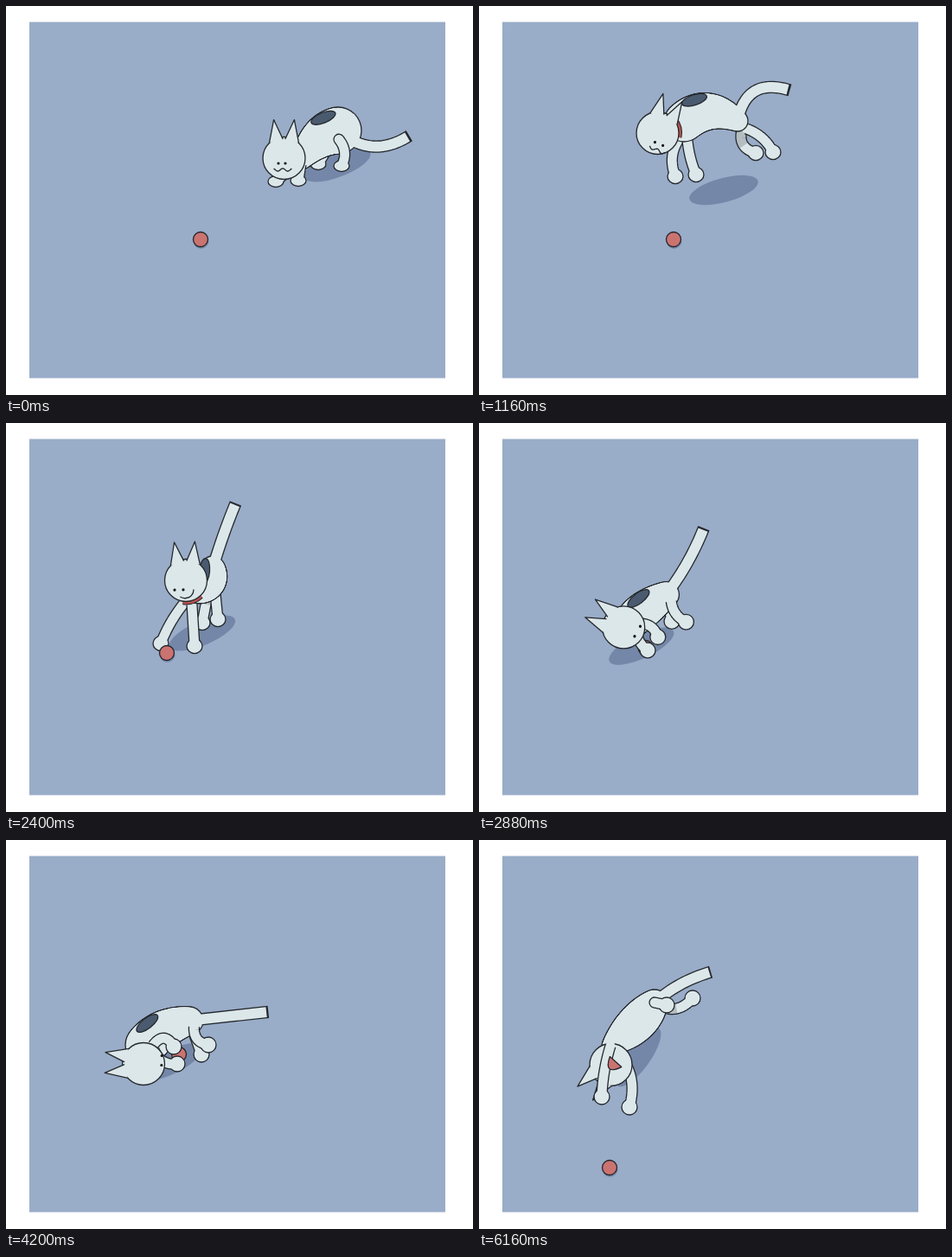
Recreate the animation shown at these times as an HTML page with a canvas. Size 540 by 450 pixels, loop 6.4 s.

```html
<!DOCTYPE html>
<html lang="en">
<head>
<meta charset="utf-8">
<title>Cat and ball</title>
<style>
html, body { margin: 0; height: 100%; overflow: hidden; background: #fff; }
canvas { display: block; }
</style>
</head>
<body>
<canvas id="stage" width="540" height="450"></canvas>
<script>
const ctx = document.getElementById('stage').getContext('2d');
const INK = '#24282c', FUR = '#dce7ea', FLOOR = '#99acc8', SHADE = '#7487a8', RED = '#cb7371', PATCH = '#4a5a6f';
const LOOP = 6400, TAU = 2 * Math.PI, HEAD = 24.5, PAW = 9, LINE = 1.3;

// layers: parts from back to front. spine: neck, middle, rump as x, y, radius.
// paws: far hind, near hind, far front, near front as x, y, bend; tail: tip and bend.
// head: x, y, tilt in degrees; face: offset of the eyes, half their distance.
const crouch = {
  layers: 's1bp534hewo', flat: .72, hip: .25, spot: .78, shadow: [383, 184, -.36],
  spine: [[342, 177, 12], [362, 154, 22], [384, 144, 27]],
  paws: [[361, 183, 0], [388, 185, -5], [312, 203, 0], [338, 202, 0]],
  tail: [465, 151, 15], head: [321.5, 176, -90], face: [-2.5, 6, 4]
};
const leap = {
  layers: 's1324bpchewo', flat: .95, hip: .25, spot: .3, shadow: [283, 213, -.26],
  spine: [[237, 134, 23], [266, 122, 21], [299, 133, 12]],
  paws: [[320, 170, 8], [340, 169, -4], [227, 197, 7], [251, 195, 2]],
  tail: [358, 97, -19], head: [206.5, 147, -67], face: [1.5, 12.5, 5]
};
const stand = {
  layers: 's1234bpcheuo', flat: .95, hip: .25, spot: .9, shadow: [227, 243, -.4],
  spine: [[214, 194, 13], [233, 186, 19], [239, 168, 14]],
  paws: [[227, 231, 0], [245, 227, 0], [179, 255, 2], [218, 258, 0]],
  tail: [265, 94, -1], head: [208, 182, -92], face: [-8, 11, 5]
};
const roll = {
  layers: 's1bp2o34he', flat: 1, hip: .25, spot: .35, shadow: [178, 262, -.45],
  spine: [[170, 235, 22], [185, 220, 21], [211, 206, 15]],
  paws: [[222, 229, 0], [238, 231, 5], [199, 265, 5], [204, 245, -6]],
  tail: [271, 154, 4], head: [165, 250, -174], face: [22, 3, 7]
};
const flop = { ...roll, tail: [258, 130, 4], head: [157, 250, -165] };
const cuddle = {
  ...roll, spot: .3, shadow: [190, 257, -.45],
  spine: [[162, 237, 24], [183, 219, 22], [212, 209, 16]],
  paws: [[226, 248, 0], [234, 237, 6], [198, 259, 6], [194, 239, -9]],
  tail: [302, 199, 0], head: [159, 259, -178], face: [21, -4, 5.5], gape: 1
};
const toss = {
  ...cuddle, layers: 's1bp234hego', shadow: [196, 250, -.5],
  paws: [[228, 250, 0], [207, 249, 0], [200, 271, 4], [190, 252, -11]],
  tail: [289, 151, 6], head: [161, 258, -201], face: [4.5, 5, 5], gape: 4
};
const reach = {
  ...toss, layers: 's13b5h4go', hip: 0, shadow: [184, 251, -.95],
  spine: [[152, 238, 10], [181, 213, 22], [203, 188, 15]],
  paws: [[247, 183, 10], [217, 191, 0], [174, 309, -12], [142, 297, 2]],
  tail: [267, 153, -4], head: [152.5, 260, -228], face: [-2.5, 5.5, 5], gape: 12
};

const poses = [[0, crouch], [900, crouch], [1160, leap], [1520, stand], [2400, stand], [3000, flop],
  [3360, roll], [3720, cuddle], [4480, cuddle], [5200, toss], [5920, reach], [LOOP, reach]];

// Ball: x, y, height above the floor
const balls = [[0, [225, 270, 0]], [1680, [225, 270, 0]], [2280, [186, 266, 0]], [2400, [186, 266, 0]],
  [3360, [199, 254, 0]], [3720, [200, 248, 0]], [4800, [200, 248, 0]],
  [5200, [186, 303, 18]], [5920, [151, 379, 0]], [LOOP, [151, 379, 0]]];

const range = (from, to, step) => Array.from({ length: (to - from) / step + 1 }, (_, i) => from + i * step);
const ticks = [0, ...range(320, 800, 120), 960, ...range(1000, 1160, 80), 1280, ...range(1400, 1480, 80),
  ...range(1560, 5040, 120), 5120, ...range(5200, 6160, 120)];

function mix(a, b, k) {
  if (a === undefined || b === undefined) return a ?? b;
  if (typeof a === 'number') return a + (b - a) * k;
  if (typeof a === 'string') return k < .5 ? a : b;
  if (Array.isArray(a)) return a.map((v, i) => mix(v, b[i], k));
  return Object.fromEntries(Object.keys({ ...a, ...b }).map(key => [key, mix(a[key], b[key], k)]));
}

function sample(keys, t) {
  const i = keys.findIndex(key => key[0] > t);
  const [t0, a] = keys[i - 1], [t1, b] = keys[i];
  return mix(a, b, (t - t0) / (t1 - t0));
}

// Parabola through three points at u = 0, 1/2 and 1
const along = ([a, b, c], u) =>
  a.map((v, i) => v * (1 - u) * (1 - 2 * u) + b[i] * 4 * u * (1 - u) + c[i] * u * (2 * u - 1));

function bow(from, [x, y, bend]) {
  const dx = x - from[0], dy = y - from[1], s = bend / Math.hypot(dx, dy);
  return [from.slice(0, 2), [from[0] + dx / 2 - dy * s, from[1] + dy / 2 + dx * s], [x, y]];
}

function band(points, width, color, cap = 'butt', end = 1) {
  ctx.beginPath();
  for (const u of range(0, 20, 1)) ctx.lineTo(...along(points, u / 20 * end));
  ctx.lineCap = cap;
  ctx.lineWidth = width;
  ctx.strokeStyle = color;
  ctx.stroke();
}

function ink(fill) {
  if (fill) { ctx.fillStyle = fill; ctx.fill(); }
  ctx.lineWidth = LINE;
  ctx.strokeStyle = INK;
  ctx.stroke();
}

function oval(x, y, rx, ry = rx, turn = 0) {
  ctx.beginPath();
  ctx.ellipse(x, y, rx, ry, turn, 0, TAU);
}

function dot(x, y, r, color) {
  oval(x, y, r);
  ctx.fillStyle = color;
  ctx.fill();
}

function drawBody({ spine, tail }) {
  const line = bow(spine[2], tail);
  for (const [color, grow, end] of [[INK, LINE / 2, 1.015], [FUR, -LINE / 2, .99]]) {
    band(line, 13 + 2 * grow, color, 'butt', end);
    for (const u of range(0, 40, 1)) {
      const [x, y, r] = along(spine, u / 40);
      dot(x, y, r + grow, color);
    }
  }
}

function drawPatch({ spine, spot }) {
  const [x, y, r] = along(spine, spot), [x1, y1] = along(spine, spot + .01);
  const turn = Math.atan2(y1 - y, x1 - x), out = r - 6.5;
  oval(x + Math.sin(turn) * out, y - Math.cos(turn) * out, 15, 6, turn);
  ink(PATCH);
}

function drawLeg(p, i, cap) {
  const paw = p.paws[i], root = mix(p.spine[i < 2 ? 2 : 0].slice(0, 2), paw, p.hip);
  const line = bow(root, paw);
  band(line, 12 + LINE, INK, cap);
  oval(paw[0], paw[1], PAW, PAW * p.flat);
  ink(FUR);
  band(line, 12 - LINE, FUR, 'round');
  if (i === 0) band(line, 12 - LINE, 'rgba(60,65,70,.25)', 'butt', .55);
}

function drawCollar({ spine, head: [x, y] }) {
  const toNeck = Math.atan2(spine[0][1] - y, spine[0][0] - x);
  ctx.lineCap = 'butt';
  for (const [width, color] of [[6, INK], [4, '#b9524f']]) {
    ctx.beginPath();
    ctx.arc(x, y, HEAD + 1, toNeck - .3, toNeck + .6);
    ctx.lineWidth = width;
    ctx.strokeStyle = color;
    ctx.stroke();
  }
}

function drawHead([x, y, tilt]) {
  oval(x, y, HEAD);
  ink(FUR);
  for (const side of [-1, 1]) {
    ctx.beginPath();
    for (const [degrees, r] of [[4, HEAD - 2], [15, 46], [44, HEAD]]) {
      const angle = (tilt + side * degrees) * TAU / 360;
      ctx.lineTo(x + r * Math.cos(angle), y + r * Math.sin(angle));
    }
    ink(FUR);
  }
}

// Face parts are drawn upright around the point between the eyes
function drawFace(part, { head: [x, y, tilt], face: [dx, dy, gap], gape }) {
  ctx.save();
  ctx.translate(x + dx, y + dy);
  ctx.rotate((tilt + 90) * TAU / 360);
  if (part === 'e') {
    for (const side of [-1, 1]) dot(side * gap, 0, 1.6, '#111');
  } else {
    ctx.beginPath();
    if (part === 'w') {
      for (const u of range(-10, 10, 1)) ctx.lineTo(u + 1, 7.5 - 1.6 * Math.cos(u * .55));
    } else if (part === 'u') {
      ctx.arc(7, 0, 10, 0, 2.2);
    } else {
      ctx.moveTo(-9, 12);
      ctx.quadraticCurveTo(0, 12 - 1.8 * gape, 9, 12);
      ctx.closePath();
    }
    ink(part === 'g' && RED);
  }
  ctx.restore();
}

function drawShadows([x, y, turn], [bx, by, lift]) {
  ctx.fillStyle = SHADE;
  oval(x, y, 41, 14, turn);
  ctx.fill();
  oval(bx + 1, by + 3 + lift * .9, 8.5, 7.5 - lift * .18, -.4);
  ctx.fill();
}

function drawBall([x, y, lift]) {
  const stretch = lift * .14;
  oval(x, y, 8.5 - stretch, 8.5 + stretch, .4);
  ink(RED);
}

function drawPart(part, p, ball) {
  switch (part) {
    case 's': return drawShadows(p.shadow, ball);
    case 'b': return drawBody(p);
    case 'p': return drawPatch(p);
    case 'c': return drawCollar(p);
    case 'h': return drawHead(p.head);
    case 'o': return drawBall(ball);
    case '5': return drawLeg(p, 1, 'round');
    case '1': case '2': case '3': case '4': return drawLeg(p, part - 1);
    default: drawFace(part, p);
  }
}

// Small swings on top of the poses
function swing(p, t) {
  const wave = (from, to, period) => t >= from && t <= to ? Math.sin((t - from) / period * TAU) : 0;
  const wiggle = wave(320, 920, 400), bat = wave(1680, 2280, 600), kick = wave(3840, 4440, 360);
  p.spine[2][0] += 4 * wiggle;
  p.tail[0] += 10 * wiggle - 6 * bat;
  p.tail[1] -= 5 * Math.abs(bat) + 3 * kick;
  p.paws[2][0] += 9 * bat;
  p.paws[2][1] -= 5 * Math.abs(bat);
  p.paws[0][0] += 4 * kick;
  p.paws[1][0] -= 4 * kick;
  return p;
}

function render(now) {
  const time = now % LOOP;
  const t = ticks.findLast(tick => tick <= time);
  const pose = swing(sample(poses, t), t), ball = sample(balls, t);
  ctx.fillStyle = '#fff';
  ctx.fillRect(0, 0, 540, 450);
  ctx.fillStyle = FLOOR;
  ctx.fillRect(27, 18.5, 481, 412);
  ctx.lineJoin = 'round';
  for (const part of pose.layers) drawPart(part, pose, ball);
  requestAnimationFrame(render);
}
requestAnimationFrame(render);
</script>
</body>
</html>
```
